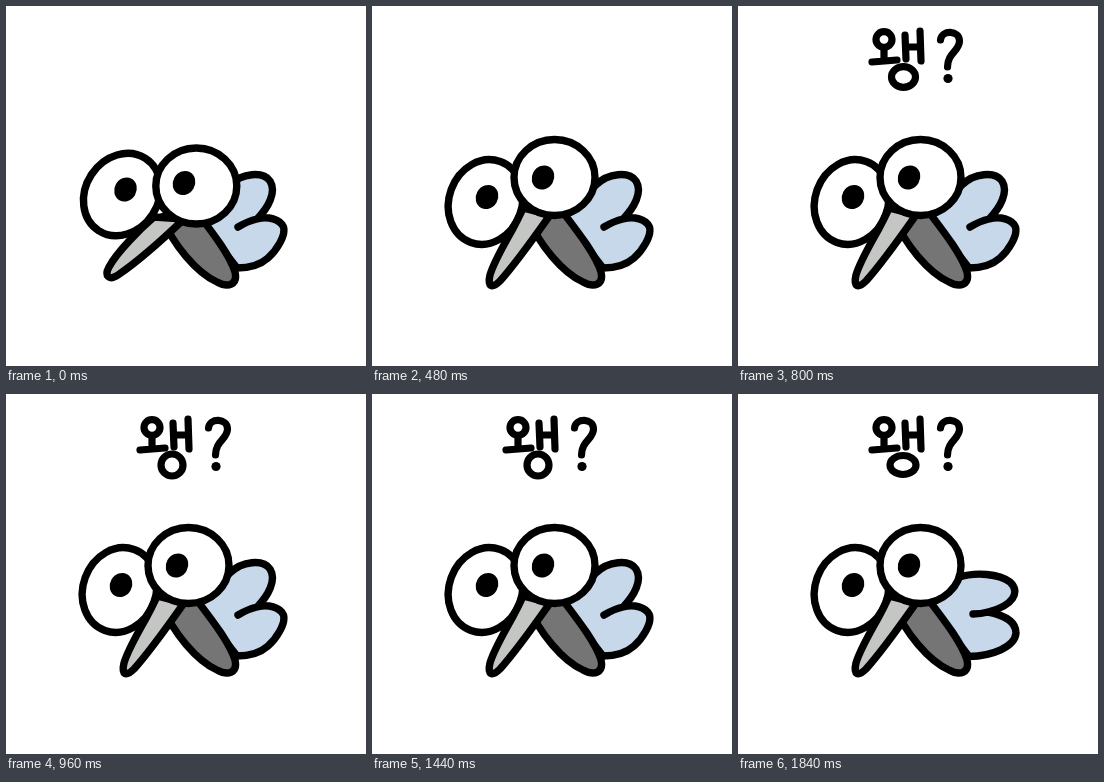
Recreate the animation shown at these times as an HTML page without scripts. Size 360 px wide and 360 px high, loop 1920 ms.

```html
<!DOCTYPE html>
<html lang="ko">
<head>
<meta charset="utf-8">
<title>왱?</title>
<style>
html, body { margin: 0; width: 100%; height: 100%; overflow: hidden; background: #fff; }
svg { display: block; width: 100vw; height: 100vh; }

.ink { stroke: #000; stroke-width: 7.4; stroke-linecap: round; stroke-linejoin: round; fill: none; }
.wing { fill: #c7d8ea; }
.body { fill: #757575; }
.beak { fill: #c4c6c4; }
.eye { fill: #fff; }
.pupil { fill: #000; stroke: none; }
.dot { fill: #000; stroke: none; }

.wing, .pose, .word, .boil { animation: 1.92s step-end infinite; }

/* wings flap every 80 ms */
.wing { animation-name: flap; animation-duration: .16s; }
.down { animation-delay: -.08s; }
@keyframes flap { 0% { opacity: 1 } 50%, to { opacity: 0 } }

/* the head tilts, then the word pops in */
.calm { animation-name: calm; }
.tilt { animation-name: tilt; }
.word { animation-name: pop; transform-origin: 178px 53px; }
@keyframes calm { 0% { opacity: 1 } 25%, to { opacity: 0 } }
@keyframes tilt { 0% { opacity: 0 } 25%, to { opacity: 1 } }
@keyframes pop {
  0% { opacity: 0; transform: scale(.68) }
  29.16% { opacity: 1; transform: scale(.68) }
  33.33%, to { opacity: 1; transform: none }
}

/* three drawings of the word take turns */
.boil { animation-name: boil; animation-duration: .24s; }
.b2 { animation-delay: -.16s; }
.b3 { animation-delay: -.08s; }
@keyframes boil { 0% { opacity: 1 } 33.33%, to { opacity: 0 } }
</style>
</head>
<body>
<svg viewBox="0 0 360 360" role="img" aria-label="왱?">
  <defs>
    <ellipse id="left" class="eye" rx="36.5" ry="43"/>
    <ellipse id="right" class="eye" rx="40.5" ry="38"/>
    <ellipse id="pupil" class="pupil" rx="11" ry="12.3" transform="rotate(30)"/>
    <g id="strokes">
      <ellipse cx="146" cy="33.5" rx="8" ry="7.8"/>
      <path d="M146 43V54M134 56Q146 55 159 54M167 29L168 53M168 41H181M182 25L183 55"/>
      <path d="M202.5 34C203.500 23.500 221.500 24 221.500 35C221.500 45 209.500 47 209.500 61"/>
      <circle class="dot" cx="210" cy="72.500" r="4.600"/>
    </g>
  </defs>

  <g class="ink">
    <path class="wing up" d="M196 207L224 179C236 167 257 165 264 175C271 186 262 202 251 213C262 210 274 213 277.500 221C280 230 270 245 262 252C253 260 243 262 231 262L200 222M251 213Q242 215 232 221"/>
    <path class="wing down" d="M196 207L220 183.500C238 177.500 261 180 272 188C283 198 275 212 250 218C270 222 278 230 278 239C277 253 254 262 231 262.500L200 222M250 218Q243 220 235 220"/>

    <path class="body" d="M156 211C167 239 191 267 211 276C222 282 232 279 229 266C224 249 206 226 190 205Z"/>

    <g class="pose calm">
      <use href="#left" transform="translate(116 188.500) rotate(33)"/>
      <path class="beak" d="M148 211C134 223 111 246 103 261C98 270 103 275 112 269C131 256 154 236 178 213Z"/>
      <use href="#right" x="190.300" y="180"/>
      <use href="#pupil" x="119.500" y="183.500"/>
      <use href="#pupil" x="178" y="177"/>
    </g>

    <g class="pose tilt">
      <use href="#left" transform="translate(113.500 196) rotate(20)"/>
      <path class="beak" d="M151 202C142 224 124 249 118 269C115 281 120 283 128 275C145 256 161 233 178 209Z"/>
      <use href="#right" x="182.500" y="171.500"/>
      <use href="#pupil" x="115" y="191"/>
      <use href="#pupil" x="171" y="171.500"/>
    </g>

    <g class="word" stroke-width="7.2">
      <g class="boil">
        <use href="#strokes"/>
        <circle cx="166" cy="71" r="11"/>
      </g>
      <g class="boil b2">
        <use href="#strokes"/>
        <ellipse cx="165.500" cy="71" rx="12" ry="10.300"/>
      </g>
      <g class="boil b3">
        <use href="#strokes"/>
        <ellipse cx="165" cy="71" rx="13" ry="9.500"/>
      </g>
    </g>
  </g>
</svg>
</body>
</html>
```
